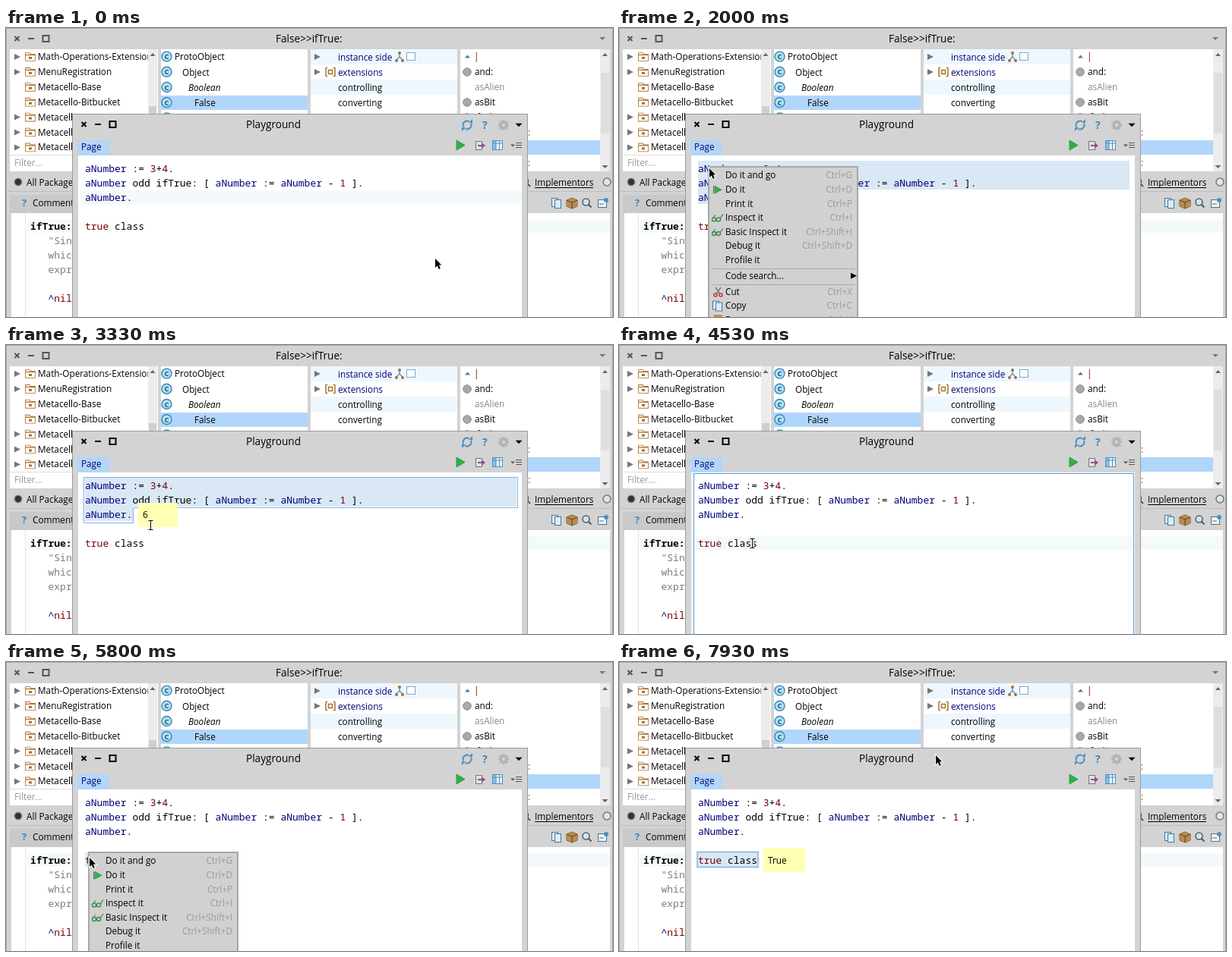
An HTML page with a canvas that plays this animation: 799x381 px, repeating every 8 s.

```html
<!DOCTYPE html>
<html>
<head>
<meta charset="utf-8">
<style>
html, body { margin: 0; width: 100%; height: 100%; overflow: hidden; background: #d3d3d3; }
canvas { display: block; }
</style>
</head>
<body>
<canvas id="stage" width="799" height="381"></canvas>
<script>
const c = document.getElementById('stage').getContext('2d');
const UI = '11.75px "Open Sans", sans-serif';
const TITLE = '13.6px "Open Sans", sans-serif';
const CODE = '13px "Noto Sans Mono", monospace';
const NAVY = '#000078', MAROON = '#780000', GREY = '#d3d3d3', BLUE = '#4a90c4', BROWN = '#a8722c';
const CHAR = 7.8, LEFT = 104;

function rect(x, y, w, h, color) {
  c.fillStyle = color;
  c.fillRect(x, y, w, h);
}
function frame(x, y, w, h, color, width = 1) {
  c.strokeStyle = color;
  c.lineWidth = width;
  c.strokeRect(x + .5, y + .5, w - 1, h - 1);
}
function poly(points, fill, stroke, width = 1) {
  c.beginPath();
  for (let i = 0; i < points.length; i += 2) c.lineTo(points[i], points[i + 1]);
  c.closePath();
  if (stroke) { c.strokeStyle = stroke; c.lineWidth = width; c.stroke(); }
  if (fill) { c.fillStyle = fill; c.fill(); }
}
function line(points, color, width = 1) {
  c.beginPath();
  for (let i = 0; i < points.length; i += 2) c.lineTo(points[i], points[i + 1]);
  c.strokeStyle = color;
  c.lineWidth = width;
  c.stroke();
}
function disc(x, y, r, fill, stroke, width = 1) {
  c.beginPath();
  c.arc(x, y, r, 0, 7);
  if (fill) { c.fillStyle = fill; c.fill(); }
  if (stroke) { c.strokeStyle = stroke; c.lineWidth = width; c.stroke(); }
}
function text(s, x, y, color = '#000', font = UI, align = 'left') {
  c.font = font;
  c.fillStyle = color;
  c.textAlign = align;
  c.fillText(s, x, Math.round(y));
}
function code(s, x, y) {
  for (const part of s.split(/(aNumber|true|nil|\^|\d)/)) {
    const color = /^(aNumber|\^)$/.test(part) ? NAVY : /^(true|nil|\d)$/.test(part) ? MAROON : '#000';
    text(part, x, y, color, CODE);
    x += part.length * CHAR;
  }
}
const right = (x, y, color = '#777') => poly([x, y - 4, x + 8, y, x, y + 4], color);
const down = (x, y, color, r = 4) => poly([x - r, y - r / 2, x + r, y - r / 2, x, y + r / 2], color);
const up = (x, y, color) => poly([x - 3.5, y + 2, x, y - 2, x + 3.5, y + 2], color);

function windowButtons(x, y, color) {
  line([x - 3, y - 3, x + 3, y + 3], color, 2);
  line([x + 3, y - 3, x - 3, y + 3], color, 2);
  rect(x + 14.5, y - 1, 8, 2, color);
  frame(x + 33.5, y - 4.5, 9, 9, color, 2);
}
function folder(x, y) {
  poly([x, y - 5, x + 5, y - 5, x + 6, y - 3, x + 12, y - 3, x + 12, y + 5, x, y + 5], '#fff', BROWN, 1.7);
  line([x, y - 2.5, x + 12, y - 2.5], BROWN, 1.3);
  rect(x + 4, y, 4, 3, BROWN);
}
function lens(x, y) {
  disc(x, y, 4.5, '#d0e2ec', '#566', 1.6);
  line([x + 3, y + 3, x + 7, y + 7], '#555', 2);
}
function pages(x, y) {
  for (const d of [0, 4]) {
    rect(x - 6 + d, y - 7 + d / 2, 9, 12, '#dcebf4');
    frame(x - 6 + d, y - 7 + d / 2, 9, 12, '#46789a');
  }
}

function browser() {
  rect(0, 0, 799, 381, GREY);
  frame(0, 0, 799, 400, '#a5a5a5');
  windowButtons(14.5, 14, '#555');
  text('False>>ifTrue:', 355, 19, '#000', TITLE);
  down(785, 14, '#777');
  for (const [x, w] of [[5, 195], [204, 193], [401, 193], [598, 197]]) rect(x, 28, w, 161, '#fff');

  rect(187, 28, 12, 161, '#ececec');
  rect(188, 103, 10, 60, '#cfcfcf');
  up(193, 35, '#666');
  ['Math-Operations-Extensions', 'MenuRegistration', 'Metacello-Base', 'Metacello-Bitbucket',
    'Metacello-Core', 'Metacello-FileTree', 'Metacello-Github'].forEach((name, i) => {
    const y = 38 + i * 19.9;
    c.save();
    c.beginPath(); c.rect(5, 28, 182, 161); c.clip();
    if (i < 2 || i > 3) right(11, y);
    folder(26, y);
    text(name, 42, y + 4);
    c.restore();
  });
  rect(5, 167, 182, 1, '#ddd');
  text('Filter...', 11, 182, '#999');

  rect(204, 89, 193, 19, '#b1d6fb');
  ['ProtoObject', 'Object', 'Boolean', 'False', ''].forEach((name, i) => {
    const y = 37.6 + i * 20.2;
    disc(211.5, y, 6.5, '#b4dff0', '#3489b4', 1.4);
    text('C', 211.5, y + 3.5, '#0f5c84', 'bold 9.5px "Open Sans", sans-serif', 'center');
    text(name, [222, 232, 240, 248][i] || 256, y + 4.8, '#000', i === 2 ? 'italic ' + UI : UI);
  });

  for (const y of [28, 68]) rect(401, y, 193, 20, '#eef7fe');
  right(406, 38);
  right(406, 58);
  text('instance side', 437, 43, NAVY);
  line([518, 33, 518, 38, 513, 43], BLUE, 1.3);
  line([518, 38, 523, 43], BLUE, 1.3);
  for (const [x, y] of [[518, 33], [514, 43], [522, 43]]) disc(x, y, 2, BROWN);
  rect(527, 32, 12, 11, '#fff');
  frame(527, 32, 12, 11, '#7aa7c7');
  line([423, 52, 421, 53, 421, 63, 423, 64], BROWN, 1.5);
  line([431, 52, 433, 53, 433, 63, 431, 64], BROWN, 1.5);
  frame(424, 55, 6, 6, BROWN, 1.5);
  text('extensions', 437, 63, NAVY);
  text('controlling', 437, 83);
  text('converting', 437, 103);

  up(607.5, 37.5, '#4b7fa8');
  text('|', 616, 42, MAROON);
  ['and:', 'asAlien', 'asBit', 'ifFalse:'].forEach((name, i) => {
    const y = 58 + i * 20;
    if (i !== 1) disc(607, y, 5.3, '#a9a9a9', '#888');
    text(name, 617, y + 4, i === 1 ? '#888' : '#000');
  });
  rect(687, 148, 95, 19, '#b1d6fb');
  text(':', 687, 142, '#8a4a20');
  text(':', 687, 182, '#8a4a20');
  rect(782, 28, 13, 161, '#ececec');
  rect(783, 59, 11, 80, '#dedede');
  up(788.5, 35, '#666');
  down(788.5, 183, '#666');

  disc(16, 203, 4.8, '#333', '#888', 1.3);
  text('All Packages', 27, 208);
  lens(683, 202);
  text('Implementors', 696, 208);
  rect(696, 210, 77, 1, '#000');
  disc(791, 203, 5, '#d8e8f2', '#777', 1.5);
  rect(0, 215, 799, 1, '#bcbcbc');
  rect(5, 220, 100, 24, '#c9c9c9');
  text('?', 21, 235, '#3b85b8', 'bold 13px "Open Sans", sans-serif');
  text('Comment', 35, 235);
  pages(724, 231);
  poly([738, 227, 745, 224, 752, 227, 752, 235, 745, 238, 738, 235], '#b98b50', '#5e4020');
  line([738, 227, 745, 230, 752, 227], '#5e4020');
  line([745, 230, 745, 238], '#5e4020');
  lens(763.5, 229.5);
  rect(779, 226, 12, 11, '#eef5fa');
  frame(779, 226, 12, 11, '#556f80');
  disc(790, 227, 3, BLUE);
  line([781, 232, 787, 232], '#556f80');

  rect(7, 244, 788, 137, '#fff');
  rect(27, 252, 768, 18, '#f4fafb');
  rect(25, 244, 1, 137, '#e2e2e2');
  text('ifTrue:', 32, 266, '#000', 'bold ' + CODE);
  ['"Since', 'which', 'expression'].forEach((s, i) => text(s, 55.5, 285 + i * 19, '#7d7d7d', CODE));
  code('^nil', 55.5, 361);
}

function playground() {
  rect(87, 113, 600, 300, GREY);
  frame(87, 113, 600, 300, '#9b9b9b');
  windowButtons(102.5, 127, '#000');
  text('Playground', 316, 132, '#000', TITLE);
  c.strokeStyle = BLUE;
  c.lineWidth = 2;
  for (const a of [2.7, 5.85]) { c.beginPath(); c.arc(607, 128, 5.5, a, a + 2.5); c.stroke(); }
  poly([609, 125, 614, 125, 614, 120], BLUE);
  poly([605, 131, 600, 131, 600, 136], BLUE);
  text('?', 627, 133, '#3b85b8', 'bold 14px "Open Sans", sans-serif');
  for (let i = 0; i < 4; i++) {
    const dx = 7 * Math.cos(i * Math.PI / 4), dy = 7 * Math.sin(i * Math.PI / 4);
    line([655 - dx, 128 - dy, 655 + dx, 128 + dy], '#b3b3b3', 3);
  }
  disc(655, 128, 3.7, GREY, '#b3b3b3', 3);
  down(675, 128, '#000', 4.5);

  rect(94, 148, 42, 20, '#b3d6f7');
  text('Page', 99, 161, NAVY);
  poly([593, 148, 604, 154.5, 593, 161], '#2fae45', '#23923a');
  rect(618, 149, 9, 12, '#e2e2e2');
  frame(618, 149, 9, 12, '#777');
  line([621, 155, 629, 155], '#8f4f94', 2);
  poly([626, 151, 631, 155, 626, 159], '#8f4f94');
  rect(640, 148, 14, 13, '#eaf4fa');
  rect(640, 148, 5, 13, '#8fc0de');
  frame(640, 148, 14, 13, BLUE);
  line([645, 148, 645, 161], BLUE);
  line([649.5, 148, 649.5, 161], BLUE);
  line([640, 152, 654, 152], BLUE);
  down(667, 155, '#555', 3);
  for (const y of [151, 154, 157]) rect(671, y, 8, 1, '#555');
  rect(95, 168, 584, 213, '#fff');
}

// Selected range of whole or partial lines, closed by a hard right margin.
function select(x1, row1, x2, row2, color) {
  for (let row = row1; row <= row2; row++) {
    const a = row === row1 ? x1 : LEFT, b = row === row2 ? x2 : 672;
    rect(a, 176 + row * 19 - 1, b - a, 19, color);
  }
}

const ITEMS = [['Do it and go', 'Ctrl+G'], ['Do it', 'Ctrl+D'], ['Print it', 'Ctrl+P'], ['Inspect it', 'Ctrl+I'],
  ['Basic Inspect it', 'Ctrl+Shift+I'], ['Debug it', 'Ctrl+Shift+D'], ['Profile it', ''],
  ['Code search...', ''], ['Cut', 'Ctrl+X'], ['Copy', 'Ctrl+C'], ['Paste', 'Ctrl+V']];

function menu(x, y, px, py) {
  const w = 198;
  rect(x, y, w, 300, '#d1d1d1');
  frame(x + .5, y + .5, w - 1, 300, '#a8a8a8', 2);
  ITEMS.forEach(([label, keys], i) => {
    const top = y + 3.3 + i * 18.6 + (i > 6) * 2 + (i > 7) * 2.5, mid = top + 9.3, icon = x + 10;
    if (i === 7 || i === 8) rect(x + 4, Math.round(top - 1), w - 8, 1, '#a8a8a8');
    if (px >= x + 5 && py >= top && py < top + 18.6) rect(x + 5, Math.round(top), w - 9, 19, '#62a3e0');
    text(label, x + 23, mid + 3.8);
    text(keys, x + w - 8, mid + 3.8, '#9a9a9a', UI, 'right');
    if (i === 1) {
      rect(icon - 3, mid - 5, 1.5, 10, '#666');
      poly([icon - 1, mid - 5.5, icon + 9, mid, icon - 1, mid + 5.5], '#35ad4b');
    }
    if (i === 3 || i === 4) {
      disc(icon - 2, mid + 2, 2.5, null, '#3d8b4c', 1.4);
      disc(icon + 4, mid + 2, 2.5, null, '#3d8b4c', 1.4);
      line([icon, mid - 4, icon - 4, mid + 1], '#3d8b4c', 1.2);
      line([icon + 6, mid + 1, icon + 10, mid - 5], '#3d8b4c', 1.2);
    }
    if (i === 7) right(x + w - 10, mid, '#000');
    if (i === 8) {
      line([icon, mid - 6, icon + 6, mid + 3], '#777', 1.5);
      line([icon + 7, mid - 6, icon + 1, mid + 3], '#777', 1.5);
      disc(icon, mid + 4, 2, null, '#c33', 1.5);
      disc(icon + 7, mid + 4, 2, null, '#c33', 1.5);
    }
    if (i === 9) pages(icon + 2, mid);
    if (i === 10) rect(icon - 2, mid - 7, 11, 14, '#c98a45');
  });
}

function cursor(x, y, arrow) {
  if (arrow) {
    const shape = [0, 0, 0, 12, 2.8, 9.5, 4.8, 14, 6.8, 13, 4.9, 8.6, 8.3, 8.6];
    return poly(shape.map((v, i) => v + (i % 2 ? y : x)), '#000', '#fff', 2);
  }
  x = Math.round(x) + .5;
  y = Math.round(y) + .5;
  for (const [color, w] of [['#fff', 3], ['#000', 1]]) {
    line([x, y - 6, x, y + 6], color, w);
    line([x - 3, y - 6, x + 3, y - 6], color, w);
    line([x - 3, y + 6, x + 3, y + 6], color, w);
  }
}

// Pointer path: time, x, y
const PATH = [[0, 565, 304], [20, 565, 304], [400, 320, 254], [670, 168, 224], [800, 168, 224], [1133, 115, 197],
  [1350, 90, 175], [1480, 92, 177], [1667, 132, 187], [1733, 115, 187], [1930, 115, 187], [2000, 119, 185],
  [2733, 148, 227], [2810, 148, 227], [3333, 190, 237], [3940, 190, 237], [4250, 177, 258], [4533, 175, 261],
  [4733, 188, 260], [4800, 188, 260], [5267, 88, 260], [5400, 88, 260], [5667, 109, 254], [5800, 110, 258],
  [6267, 114, 271], [6733, 152, 296], [7000, 152, 296], [7400, 202, 264], [7735, 202, 264], [7933, 417, 123],
  [8000, 417, 123]];

function pointer(t) {
  const i = Math.max(1, PATH.findIndex(p => p[0] >= t));
  const [t0, x0, y0] = PATH[i - 1], [t1, x1, y1] = PATH[i], k = (t - t0) / (t1 - t0);
  return [x0 + (x1 - x0) * k, y0 + (y1 - y0) * k];
}
const column = x => LEFT + CHAR * Math.max(0, Math.ceil((x - LEFT) / CHAR));

function draw(t) {
  const [x, y] = pointer(t);
  const within = (a, b) => t >= a && t < b;
  const menu1 = within(1990, 2860), menu2 = within(5660, 6860);
  const note1 = within(2920, 4195), note2 = t >= 6920;
  const focused = within(590, 1990) || within(4195, 5660);
  const fill = focused ? '#b3d8fd' : '#dae8f5';

  browser();
  playground();
  if (t < 860) rect(98, 214, 581, 19, '#f4fafb');
  if (within(4195, 4860)) rect(98, 252, 580, 19, '#f4fafb');
  if (within(860, 4195)) {
    const row = t < 1400 ? Math.max(0, Math.min(2, Math.floor((y - 176) / 19))) : 0;
    select(t < 1400 ? Math.min(column(x), row === 2 ? 167 : 672) : LEFT, row, 167, 2, fill);
  }
  if (t >= 4860) {
    const start = t < 5300 ? Math.min(182, column(x)) : LEFT;
    select(start, 4, 182, 4, fill);
  }
  if (note1) {
    poly([102.5, 174.5, 673.5, 174.5, 673.5, 214.5, 167.5, 214.5, 167.5, 234.5, 102.5, 234.5], null, '#7fb2e2');
  }
  if (note2) frame(102.5, 250, 81, 21, '#7fb2e2', 1.5);
  if (focused) frame(98, 169, 580, 230, '#5b9bd5');

  code('aNumber := 3+4.', LEFT, 190);
  code('aNumber odd ifTrue: [ aNumber := aNumber - 1 ].', LEFT, 209);
  code('aNumber.', LEFT, 228);
  code('true class', LEFT, 266);
  if (within(860, 1990)) rect(166, 214, 2, 19, '#000');
  if (within(4860, 5660)) rect(182, 252, 2, 19, '#000');

  if (note1) {
    rect(174, 208, 52, 32, '#ffffb4');
    text('6', 180, 228);
  }
  if (note2) {
    rect(190, 245, 55, 32, '#ffffb4');
    text('True', 196, 266);
  }
  if (menu1) menu(117, 182, x, y);
  if (menu2) menu(108, 250, x, y);
  cursor(x, y, menu1 || menu2 || t < 60 || y < 169);
}

const STEP = 200 / 3;
function tick() {
  const t = performance.now() % 8000;
  draw(Math.floor((t + 4) / STEP) * STEP % 8000);
  requestAnimationFrame(tick);
}
tick();
</script>
</body>
</html>
```
